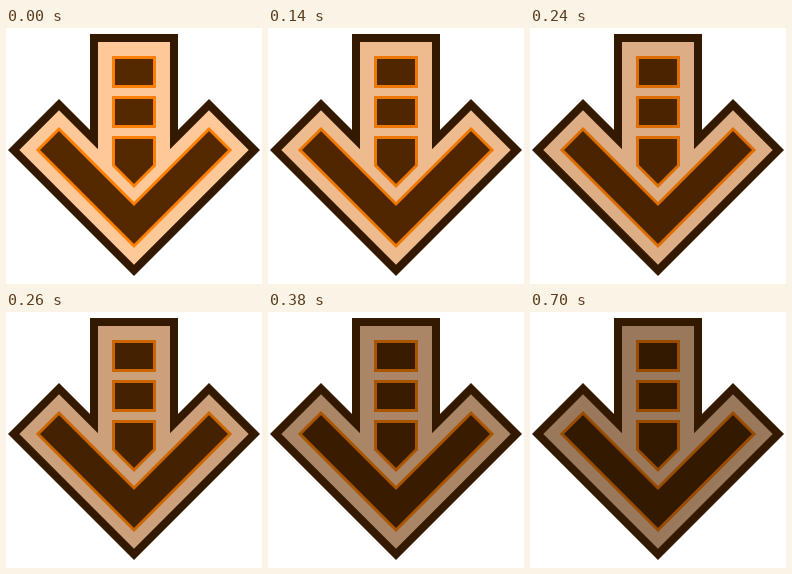
Recreate the animation shown at these times as an HTML page. Size 256 by 256 pixels, loop 0.88 s.

```html
<!DOCTYPE html>
<html lang="en">
<head>
<meta charset="utf-8">
<title>Dimming arrow</title>
<style>
  html, body { margin: 0; width: 100%; height: 100%; overflow: hidden; background: #fff; }
  svg { display: block; width: 256px; height: 256px; }
  #rim { fill: #331900; }
  #inlay { stroke-width: 3; stroke-linejoin: miter; }
</style>
</head>
<body>
<svg viewBox="0 0 256 256">
  <path id="rim" d="M84 6H172V102L203 71L254 122L128 248L2 122L53 71L84 102Z"/>
  <path id="face" d="M92 14H164V121.3L203 82.3L242.7 122L128 236.7L13.3 122L53 82.3L92 121.3Z"/>
  <g id="inlay">
    <path d="M107.5 29.5H148.5V58.5H107.5Z"/>
    <path d="M107.5 69.5H148.5V98.5H107.5Z"/>
    <path d="M107.5 109.5H148.5V137.5L128 158L107.5 137.5Z"/>
    <path d="M53 101L128 176L203 101L224 122L128 218L32 122Z"/>
  </g>
</svg>
<script>
  const LOOP = 880;
  const starts = [0, 140, 200, 260, 320, 380, 440];
  const dimmest = 0.6;

  const level = i => 1 - (1 - dimmest) * i / (starts.length - 1);
  const shade = (rgb, k) => `rgb(${rgb.map(c => Math.round(c * k)).join(",")})`;

  // Hold each shade until the next start, then jump.
  function dim(id, colours) {
    const paint = k => Object.fromEntries(
      Object.entries(colours).map(([prop, rgb]) => [prop, shade(rgb, k)]));
    const frames = starts.map((t, i) => ({
      offset: t / LOOP, easing: "steps(1, end)", ...paint(level(i))
    }));
    frames.push({ offset: 1, ...paint(dimmest) });
    document.getElementById(id).animate(frames, { duration: LOOP, iterations: Infinity });
  }

  dim("face", { fill: [255, 200, 153] });
  dim("inlay", { fill: [85, 41, 0], stroke: [255, 127, 0] });
</script>
</body>
</html>
```
